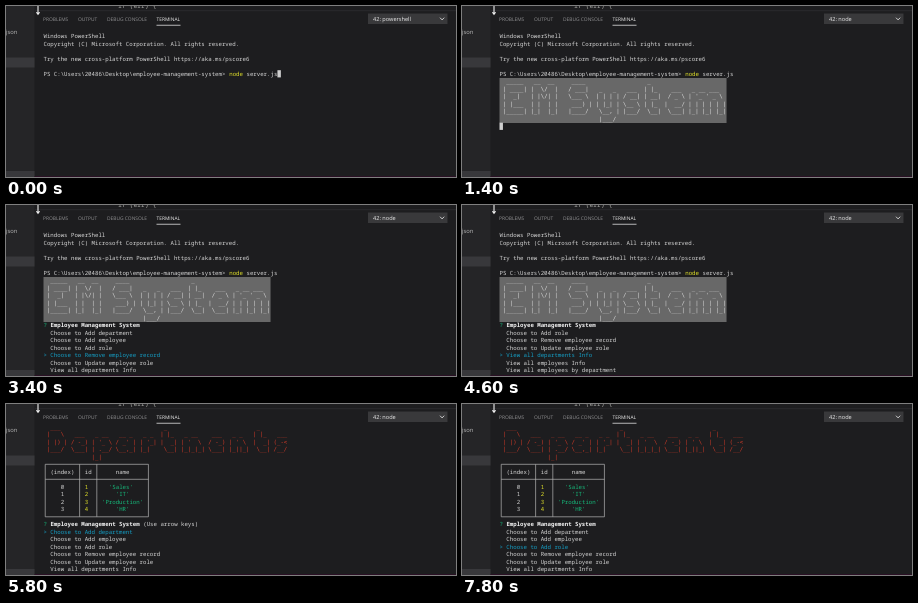
Recreate the animation shown at these times as an HTML page. Size 450 px wide and 171 px high, loop 8 s.

```html
<!DOCTYPE html>
<html lang="en">
<head>
<meta charset="utf-8">
<title>Employee terminal</title>
<style>
  html, body { margin: 0; width: 100%; height: 100%; overflow: hidden; background: #1d1d1f; }
  svg { display: block; width: 450px; height: 171px; }
  text { white-space: pre; text-rendering: geometricPrecision; }
  .mono { font: 5.735px "Noto Sans Mono", "DejaVu Sans Mono", monospace; }
  .art { font: 5.715px "DejaVu Sans Mono", monospace; }
  .ui { font: 4.9px "Open Sans", "Noto Sans", sans-serif; fill: #929294; }
</style>
</head>
<body>
<svg viewBox="0 0 450 171">
  <defs><clipPath id="panel"><rect x="29" y="24" width="421" height="146"/></clipPath></defs>
  <rect width="450" height="171" fill="#1d1d1f"/>
  <rect width="28.5" height="171" fill="#252527"/>
  <path d="M0 51.5H28.5V61.5H0ZM0 165H28.5V171H0Z" fill="#38383b"/>
  <text class="mono" x="112" y="2" fill="#a9a9a5" style="font-size:6.43px">if (err) {</text>
  <rect x="29" y="4.5" width="421" height=".6" fill="#333336"/>
  <path d="M32 0V8M30.4 6.2L32 8.4L33.6 6.2" fill="none" stroke="#eee" stroke-width="1.1"/>
  <text class="ui" x="0" y="28" style="font-size:5.8px;fill:#bbb">json</text>
  <g class="ui">
    <text x="37" y="15">PROBLEMS</text>
    <text x="72" y="15">OUTPUT</text>
    <text x="101" y="15">DEBUG CONSOLE</text>
    <text x="150.5" y="15" fill="#eee">TERMINAL</text>
  </g>
  <rect x="150.5" y="18.8" width="24" height=".8" fill="#ddd"/>
  <rect x="362" y="7.5" width="79.5" height="10.5" fill="#39393b"/>
  <text id="shell" class="ui" x="367" y="15" style="font-size:5.6px;fill:#eee"></text>
  <path d="M434 11.7L436.1 13.9L438.2 11.7" fill="none" stroke="#ddd" stroke-width=".9"/>
  <g id="screen" class="mono" clip-path="url(#panel)"></g>
  <rect x="28.5" y="170" width="421.5" height="1" fill="#2a1024"/>
</svg>
<script>
const LOOP = 8000, LEFT = 37.5, COL = 3.44, ROW = 7.5;
const C = { text: '#d6d6d6', white: '#f4f4f4', yellow: '#e3e32a', cyan: '#159fc6',
            green: '#16b87a', red: '#d33b28', gray: '#686868' };

const items = [
  'Choose to Add department', 'Choose to Add employee', 'Choose to Add role',
  'Choose to Remove employee record', 'Choose to Update employee role',
  'View all departments Info', 'View all employees Info',
  'View all employees by department', 'View all employees by manager'
];
const departments = ['Sales', 'IT', 'Production', 'HR'];

const banner = String.raw`
  _____   __  __     ____                  _
 | ____| |  \/  |   / ___|   _   _   ___  | |_    ___   _ __ ___
 |  _|   | |\/| |   \___ \  | | | | / __| | __|  / _ \ | '_ ' _ \
 | |___  | |  | |    ___) | | |_| | \__ \ | |_  |  __/ | | | | | |
 |_____| |_|  |_|   |____/   \__, | |___/  \__|  \___| |_| |_| |_|
                             |___/`.split('\n').slice(1);
const heading = String.raw`
  ___                              _                          _
 |   \   ___   _ __   __ _   _ _  | |_   _ __    ___   _ _   | |_   ___
 | |) | / -_) | '_ \ / _' | | '_| |  _| | '  \  / -_) | ' \  |  _| (_-<
 |___/  \___| | .__/ \__,_| |_|    \__| |_|_|_| \___| |_||_|  \__| /__/
              |_|`.split('\n').slice(1);

const escapeText = s => s.replace(/&/g, '&amp;').replace(/</g, '&lt;');
const colX = col => LEFT + col * COL;
const rowY = row => 30.3 + row * ROW;
const write = (col, row, s, fill = C.text, extra = '') =>
  `<text x="${colX(col)}" y="${rowY(row) + 2.1}" fill="${fill}" ${extra}>${escapeText(s)}</text>`;
const art = (lines, row, fill) =>
  lines.map((s, i) => write(0, row + i, s, fill, 'class="art"')).join('');
const block = (col, row) =>
  `<rect x="${colX(col)}" y="${rowY(row) - 3.6}" width="${COL}" height="7.2" fill="#cfcfcf"/>`;

const intro = () =>
  write(0, 0, 'Windows PowerShell') +
  write(0, 1, 'Copyright (C) Microsoft Corporation. All rights reserved.') +
  write(0, 3, 'Try the new cross-platform PowerShell https://aka.ms/pscore6') +
  write(0, 5, 'PS C:\\Users\\20486\\Desktop\\employee-management-system>') +
  write(54, 5, 'node', C.yellow) + write(59, 5, 'server.js');

const title = () =>
  `<rect x="${LEFT}" y="72" width="${66 * COL}" height="45" fill="${C.gray}"/>` +
  art(banner, 6, '#dedede');

const question = (suffix, fill) =>
  write(0, 12, '?', C.green) +
  write(2, 12, 'Employee Management System', C.white, 'font-weight="700"') +
  write(29, 12, suffix, fill);

function menu(index, fresh) {
  const first = Math.max(0, index - 3);
  return question(fresh ? '(Use arrow keys)' : '', C.text) +
    items.slice(first, first + 7).map((s, i) => {
      const active = first + i === index;
      return write(0, 13 + i, (active ? '> ' : '  ') + s, active ? C.cyan : C.text);
    }).join('');
}

// Columns of the table: first text column and width in characters.
const cell = ([col, width], row, s, fill) =>
  write(col + Math.floor((width - s.length) / 2), row, s, fill);

function table() {
  const index = [1, 9], id = [11, 4], name = [16, 14];
  const [left, right] = [colX(.5), colX(30.5)];
  const [top, middle, bottom] = [4, 6, 11].map(rowY);
  const rules = [top, middle, bottom].map(y => `M${left} ${y}H${right}`).join('') +
    [0, 10, 15, 30].map(col => `M${colX(col + .5)} ${top}V${bottom}`).join('');
  return `<path d="${rules}" fill="none" stroke="#b5b5b5" stroke-width=".7"/>` +
    cell(index, 5, '(index)') + cell(id, 5, 'id') + cell(name, 5, 'name') +
    departments.map((s, i) =>
      cell(index, 7 + i, `${i}`) + cell(id, 7 + i, `${i + 1}`, C.yellow) +
      cell(name, 7 + i, `'${s}'`, C.green)).join('');
}

const results = (index, fresh) => art(heading, -1, C.red) + table() + menu(index, fresh);
const choose = (index, fresh) => () => intro() + title() + menu(index, fresh);

const scenes = [
  [0, () => intro() + block(68, 5)],
  [200, () => intro() + block(0, 6)],
  [1400, () => intro() + title() + block(0, 12)],
  [1600, choose(0, true)],
  [3000, choose(1)],
  [3200, choose(2)],
  [3400, choose(3)],
  [3800, choose(4)],
  [4200, choose(5)],
  [5400, () => intro() + title() + question(items[5], C.cyan) + art(heading, 13, C.red) + block(0, 18)],
  [5800, () => results(0, true)],
  [7000, () => results(1)],
  [7400, () => results(2)]
];

const screenEl = document.getElementById('screen');
const shellEl = document.getElementById('shell');
let shown = null;

function draw(t) {
  const scene = scenes.findLast(([start]) => start <= t);
  shellEl.textContent = t < 400 ? '42: powershell' : '42: node';
  if (scene === shown) return;
  shown = scene;
  screenEl.innerHTML = scene[1]();
}

const origin = performance.now();
function tick() {
  draw((performance.now() - origin) % LOOP);
  requestAnimationFrame(tick);
}
tick();
</script>
</body>
</html>
```
